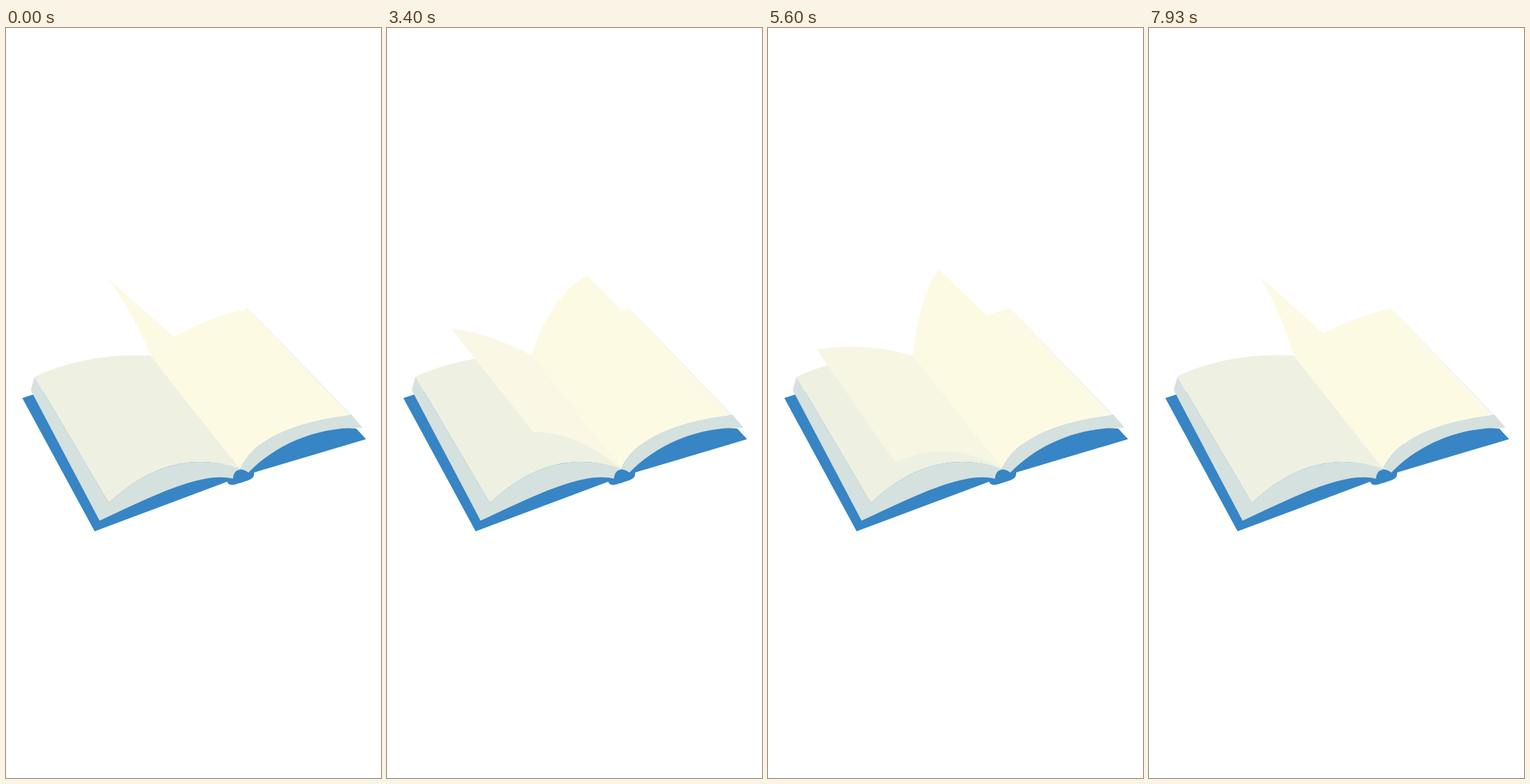
Animation of 529x1058 px, one loop 8010 ms. Source, as an HTML page:

```html
<!DOCTYPE html>
<html lang="en">
<head>
<meta charset="utf-8">
<title>Turning pages</title>
<style>
  html, body { margin: 0; height: 100%; overflow: hidden; background: #fff; }
  svg { display: block; width: 100vw; height: 100vh; }
</style>
</head>
<body>
<svg viewBox="0 0 529 1058">
  <!-- cover -->
  <path fill="#3785c5" d="M23 522L60 510L330 600L420 560L494 565L508 580L350 627Q351 635 342 638L323 644Q314 646 312 640L125 710Z"/>
  <!-- paper blocks -->
  <g fill="#d5e1de">
    <path d="M40 492L35 511L132 695C200 664 275 624 321 636L331 622Q232 588 145 670Z"/>
    <path d="M483 546L487 545L503 564C440 562 382 586 342 627L330 622Q357 562 483 546Z"/>
  </g>
  <path fill="#f3f5f1" d="M341 396L348 402L487 545L483 546Z"/>
  <!-- spine -->
  <path fill="#3785c5" d="M320 637Q321 623 331 623Q338 623 342 628L348 634L330 642Z"/>
  <path id="leftPage"/>
  <path id="rightPage"/>
  <path id="rising"/>
  <path id="falling"/>
</svg>
<script>
  const LOOP = 8010, TURN = 1000;
  const CREAM = [253, 250, 228], GREY = [238, 240, 226];

  // A page pose: the free edge's two corners and the bend leading from the spine to each.
  const RIGHT = { top: [341, 396], topBend: [250, 417], bottom: [483, 546], bottomBend: [357, 562] };
  const UPRIGHT = { top: [143, 353], topBend: [180, 402], bottom: [270, 465], bottomBend: [308, 550] };
  const LEFT = { top: [40, 492], topBend: [115, 458], bottom: [145, 670], bottomBend: [232, 588] };

  const lerp = (a, b, k) => a.map((v, i) => v + (b[i] - v) * k);

  function morph(from, to, k, lift = 0) {
    const pose = {};
    for (const part in from) {
      const [x, y] = lerp(from[part], to[part], k);
      pose[part] = [x, y - lift];
    }
    return pose;
  }

  function drawPage(id, { top, topBend, bottom, bottomBend }, greyness) {
    const page = document.getElementById(id);
    page.setAttribute("d", `M204 462Q${topBend} ${top}L${bottom}Q${bottomBend} 330 622Z`);
    page.setAttribute("fill", `rgb(${lerp(CREAM, GREY, greyness)})`);
  }

  function draw(now) {
    // Steps alternate between 30 and 70 ms, each advancing the motion by 50 ms.
    const t = now % LOOP;
    const step = Math.min(159, Math.floor(t / 100) * 2 + (t % 100 >= 30 ? 1 : 0));
    const phase = step * 50 % TURN / TURN;

    // One page swings up off the right side while the previous one settles on the left.
    const up = phase ** 1.33;
    const lift = 36 * Math.sin(Math.PI * up ** 0.75);
    const down = 1 - (1 - phase) ** 1.4;
    drawPage("rising", morph(RIGHT, UPRIGHT, up, lift), 0);
    drawPage("falling", morph(UPRIGHT, LEFT, down), Math.min(1, phase / 0.9) ** 2);
  }

  drawPage("leftPage", LEFT, 1);
  drawPage("rightPage", RIGHT, 0);

  const start = performance.now();
  function tick() {
    draw(performance.now() - start);
    requestAnimationFrame(tick);
  }
  tick();
</script>
</body>
</html>
```
